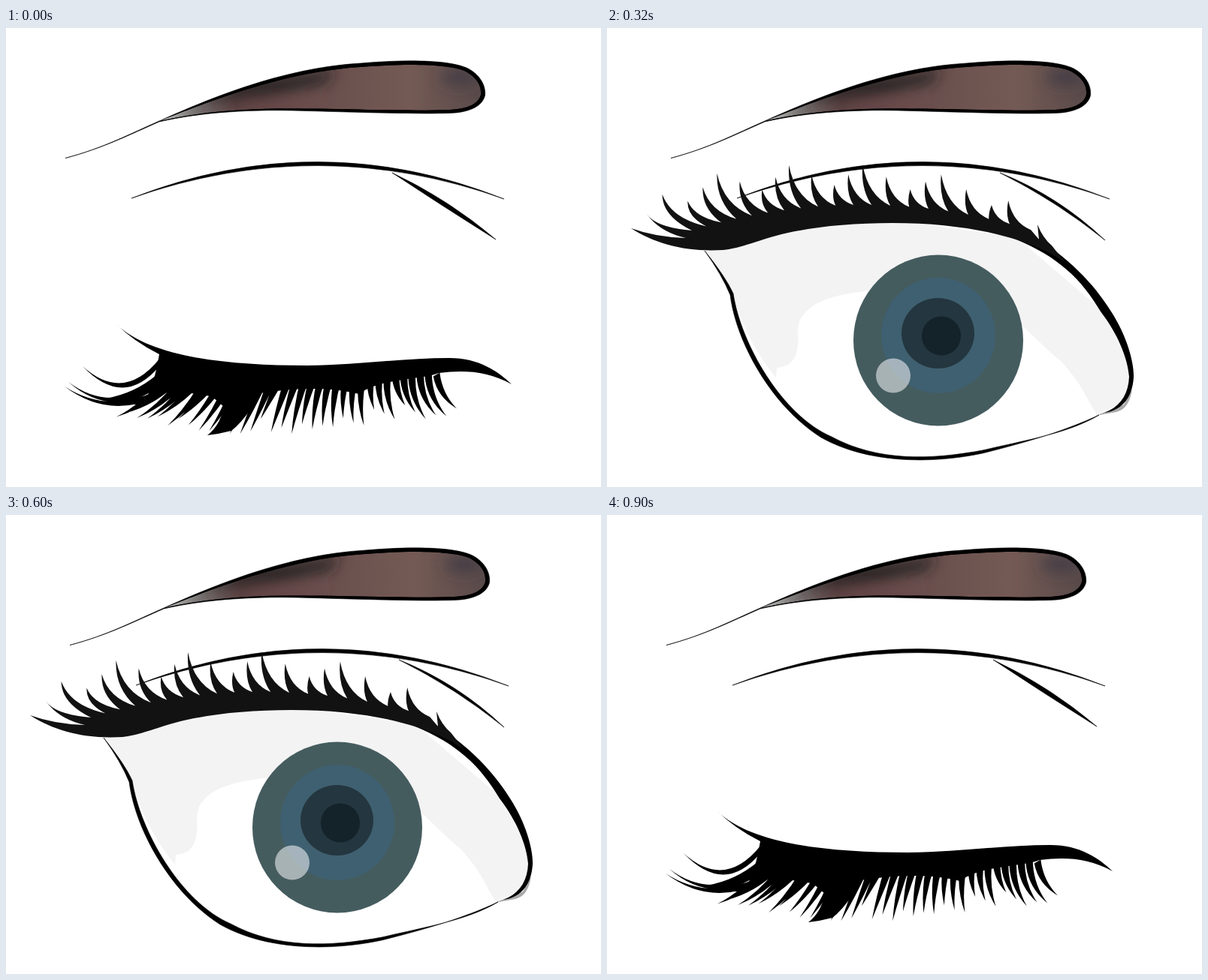
Animation of 792 by 612 pixels, one loop 1000 ms. Source, as an HTML page:

```html
<!DOCTYPE html>
<html lang="en">
<head>
<meta charset="utf-8">
<title>Blinking eye</title>
<style>
html, body { margin: 0; width: 100%; height: 100%; overflow: hidden; background: #fff; }
svg { display: block; width: 792px; height: 612px; }
.view { display: none; }
.closed #closed, .half #half, .ahead #open, .aside #open { display: inline; }
#brow { transform: translate(6px); }
.closed #brow { transform: none; }
.half #brow { transform: translate(10.8px); }
.aside #iris > * { transform: translate(var(--x), var(--y, 0)); }
.line { stroke: #000; stroke-width: .6; }
</style>
</head>
<body>
<svg id="stage" viewBox="0 0 792 612">
  <defs>
    <linearGradient id="browTone">
      <stop offset="0" stop-color="#c4c6c4"/>
      <stop offset=".1" stop-color="#7d7a79"/>
      <stop offset=".24" stop-color="#54403f"/>
      <stop offset=".5" stop-color="#694f4d"/>
      <stop offset=".78" stop-color="#745a54"/>
      <stop offset="1" stop-color="#594a4a"/>
    </linearGradient>
    <filter id="soft" x="-50%" y="-100%" width="200%" height="300%"><feGaussianBlur stdDeviation="9"/></filter>
    <clipPath id="browShape">
      <path id="browInner" d="M204 124C262 101 370 58 472 52C535 47 590 48 612 58C628 67 633 78 632 89C629 101 615 108 590 109C540 111 460 108 400 107.5C330 106 260 111 204 124Z"/>
    </clipPath>
    <clipPath id="halfEye">
      <path id="halfWhite" d="M215 458C240 502 276 539 325 559C385 579 450 575 505 565C560 554 615 540 655 516L692 497L560 512C430 514 330 494 215 458Z"/>
    </clipPath>
    <path id="halfLashes"/>
  </defs>

  <g id="brow">
    <path class="line" d="M79 173.5C130 160 165 141 204 124C262 98 365 53 472 47C530 42 590 42 615 54C632 63 639 78 637.5 90C634 105 615 113 590 113.5C540 115 460 112 400 110.5C330 108 260 112 204 125C165 142 130 160 79 173.5Z"/>
    <g clip-path="url(#browShape)">
      <use href="#browInner" fill="url(#browTone)"/>
      <g filter="url(#soft)">
        <path d="M250 100L340 70L440 55L425 74L340 92L280 99Z" fill="#1f1d22" opacity=".85"/>
        <path d="M270 113L330 99L420 98L400 113Z" fill="#774c4f" opacity=".6"/>
        <ellipse cx="603" cy="66" rx="25" ry="12" fill="#3c3744" opacity=".7"/>
      </g>
    </g>
    <path id="crease" class="line"/>
  </g>
  <path id="wrinkle" class="line"/>

  <g id="closed" class="view">
    <path d="M146 394C190 438 290 450 400 450C470 449 530 440 590 440C630 440 655 458 673 475C640 457 610 456 576 460C550 470 500 466 470 488C420 476 370 482 330 488C280 505 240 474 190 488Q200 462 204 435Q170 418 146 394Z"/>
    <path d="M255 475L345 475Q322 520 300 537Q285 541 268 543Q285 530 290 505Z"/>
    <path id="closedLashes"/>
  </g>

  <g id="half" class="view">
    <use href="#halfLashes"/>
    <use href="#halfWhite" fill="#fff"/>
    <g clip-path="url(#halfEye)">
      <use href="#halfLashes" fill="#555"/>
      <g opacity=".86">
        <circle cx="416" cy="447" r="113" fill="#274448"/>
        <circle cx="416" cy="465" r="76" fill="#21495b"/>
        <ellipse cx="415" cy="488" rx="46" ry="47" fill="#192c38"/>
        <circle cx="415" cy="501" r="26" fill="#101d25"/>
      </g>
    </g>
    <path fill="none" stroke="#b7b7b7" stroke-width="5" d="M575 546Q625 533 656 517L681 511L697 488"/>
    <path d="M215 458C240 502 276 539 325 559C385 579 450 575 505 565C560 554 615 540 655 516C610 535 560 547 505 559C445 573 385 574 330 554C285 535 255 505 215 458Z"/>
    <path d="M50 430C110 420 155 430 215 451C330 490 450 512 580 509Q635 507 693 497Q630 512 560 515C430 518 330 497 215 460C160 442 110 432 50 430Z"/>
  </g>

  <g id="open" class="view">
    <path fill="#f3f3f3" d="M131 297L240 266L380 256L545 279L663 380L698 455L690 498L652 515C638 495 635 478 605 445C555 405 520 342 382 318Q386 349 355 350C290 355 254 372 254 405Q258 452 226 453L225 466Q187 421 167 355Z"/>
    <g id="iris">
      <ellipse cx="441" cy="416.5" rx="113" ry="114" fill="#455c5f" style="--x:80px"/>
      <ellipse cx="441" cy="410" rx="76" ry="77" fill="#3f6070" style="--x:106.5px;--y:6.5px"/>
      <ellipse cx="440.5" cy="407" rx="48.5" ry="47" fill="#24363f" style="--x:121.5px;--y:3px"/>
      <circle cx="445" cy="410.5" r="26" fill="#14222a" style="--x:129.5px;--y:1.5px"/>
      <circle cx="381" cy="463.5" r="23" fill="#fff" opacity=".53" style="--x:120px;--y:17px"/>
    </g>
    <path fill="#aaa" d="M164 352Q177 411 202 448Q173 413 164 352ZM650 517L688 502L699 482Q695 508 678 512Z"/>
    <path class="line" d="M130 297Q158 332 168 354C178 420 232 516 299 545C360 578 430 576 500 563C560 549 615 540 655 516C610 537 560 552 500 567C430 582 345 580 285 546C220 505 172 420 164 356Q153 329 130 297Z"/>
    <path d="M560 272C615 306 648 341 671 378C693 412 702 448 701 466C699 495 684 510 662 513C683 505 694 489 695 465C693 440 680 408 657 378C631 334 600 305 545 282Z"/>
    <path id="openLashes" fill="#121212"/>
  </g>
</svg>
<script>
const stage = document.getElementById('stage');
const draw = (id, d) => document.getElementById(id).setAttribute('d', d);
const noise = i => Math.abs(Math.sin(i * 12.9898) * 43758.5453) % 1;

// A curved stroke that tapers to a point; curl bends it sideways.
function hair(x0, y0, x1, y1, root, belly, curl) {
  const dx = x1 - x0, dy = y1 - y0, length = Math.hypot(dx, dy);
  const nx = -dy / length, ny = dx / length;
  const cx = (x0 + x1) / 2 - dy * curl, cy = (y0 + y1) / 2 + dx * curl;
  const beside = (x, y, w) => `${x + nx * w} ${y + ny * w}`;
  return `M${beside(x0, y0, root / 2)}Q${beside(cx, cy, belly)} ${x1} ${y1}`
    + `Q${beside(cx, cy, -belly)} ${beside(x0, y0, -root / 2)}Z`;
}

function closedLashes() {
  const count = 34;
  let d = hair(205, 445, 102, 451, 9, 4, -.55)
    + hair(195, 480, 83, 472, 9, 3, -.35)
    + hair(200, 488, 78, 478, 9, 3, -.29);
  for (let i = 0; i <= count; i++) {
    const u = i / count;
    const x = 203 + 370 * u;
    const tipY = 516 + 28 * Math.sin(Math.PI * u) - 26 * noise(i + 1) ** 2;
    d += hair(x, 468 - 6 * u, x - 70 + 97 * u, tipY, 12 - 2 * u, 4, .35 * u - .15);
  }
  return d;
}

function halfLashes() {
  let d = 'M105 433Q365 550 625 511Q420 512 215 451Z';
  for (let i = 0; i < 18; i++) {
    const s = 20 * i + .5 * i * i;
    const x = 105 + s;
    const y = 433 + .451 * s - .000578 * s * s;
    d += hair(x, y - 5, x - 45 * Math.exp(-s / 120) - 2, y + 20 - 6 * Math.cos(2 * i), 20, 6, .3);
  }
  return d;
}

// Lengths repeat tall, middle, short, middle; the outer lashes lean further.
function openLashes() {
  const notchY = x => 236 + .00066 * (x - 340) ** 2;
  let x = 113, y = notchY(x);
  let d = `M32 267Q65 279 105 280Q70 272 53 248Q65 266 ${x} ${y}`;
  for (let i = 1; i < 20; i++) {
    const nextX = 113 + 19 * i + .25 * i * i, nextY = notchY(nextX);
    const wave = Math.cos(Math.PI * i / 2);
    const tipX = nextX - 30 - 40 * Math.exp(-i / 3) - 6 * wave;
    const tipY = nextY - 43 + .2 * i - 14 * wave;
    d += `Q${tipX + .1 * (x - tipX) - 4} ${tipY + .6 * (y - tipY)} ${tipX} ${tipY}`
      + `Q${tipX + .2 * (nextX - tipX)} ${tipY + .75 * (nextY - tipY)} ${nextX} ${nextY}`;
    [x, y] = [nextX, nextY];
  }
  return d + 'L575 282L573 262Q580 280 592 290L610 313C565 280 480 260 380 260C320 260 265 266 225 277C190 287 175 294 155 296C105 299 65 288 32 267Z';
}

draw('crease', hair(167, 227, 663, 228, 0, 5, -.1875));
draw('closedLashes', closedLashes());
draw('halfLashes', halfLashes());
draw('openLashes', openLashes());

const wrinkles = {
  closed: hair(514, 193, 652, 282, 0, 6, -.03),
  half: hair(528, 193, 667, 283, 0, 5, -.055),
  ahead: hair(523, 193, 663, 283, 0, 3.5, -.075)
};
wrinkles.aside = wrinkles.ahead;

// One entry per 100 ms.
const poses = ['closed', 'half', 'ahead', 'ahead', 'aside', 'aside', 'ahead', 'ahead', 'half', 'closed'];

function tick() {
  const pose = poses[Math.floor(performance.now() / 100) % poses.length];
  stage.setAttribute('class', pose);
  draw('wrinkle', wrinkles[pose]);
  requestAnimationFrame(tick);
}
tick();
</script>
</body>
</html>
```
